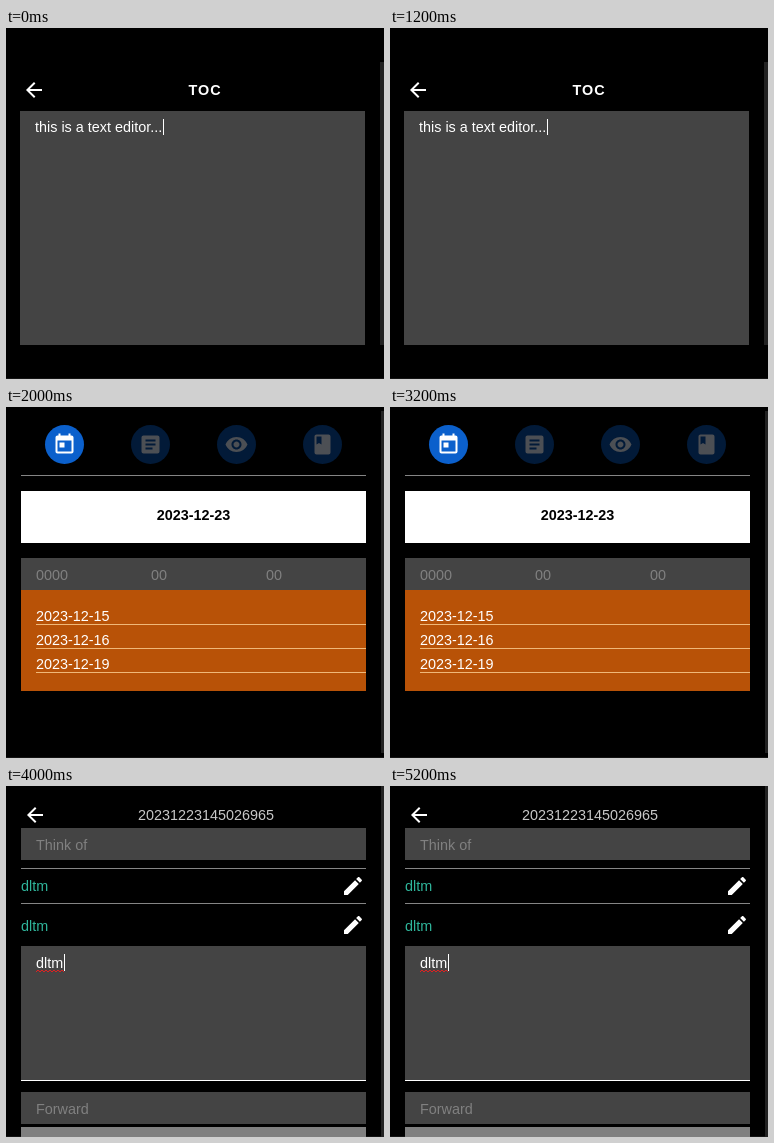
Recreate the animation shown at these times as an HTML page with a canvas. Size 378 by 351 pixels, loop 6 s.

```html
<!DOCTYPE html>
<html lang="en">
<head>
<meta charset="utf-8">
<title>Notes</title>
<style>
  html, body { margin: 0; width: 100%; height: 100%; overflow: hidden; background: #000; }
  canvas { display: block; }
</style>
</head>
<body>
<canvas id="stage" width="378" height="351"></canvas>
<script>
const ctx = document.getElementById('stage').getContext('2d');
const SCREEN_MS = 2000;
const FONT = '14.4px "Liberation Sans", Arial, sans-serif';
const PANEL = '#444', MUTED = '#808080', RULE = '#858585';

// Icons on a 24 px grid
const icons = {
  back: 'M20 11H7.83l5.59-5.59L12 4l-8 8 8 8 1.41-1.41L7.83 13H20z',
  today: 'M19 3h-1V1h-2v2H8V1H6v2H5c-1.11 0-1.99.9-1.99 2L3 19c0 1.1.89 2 2 2h14c1.1 0 2-.9 2-2V5c0-1.1-.9-2-2-2zm0 16H5V8h14zM7 10h5v5H7z',
  article: 'M19 3H5c-1.1 0-2 .9-2 2v14c0 1.1.9 2 2 2h14c1.1 0 2-.9 2-2V5c0-1.1-.9-2-2-2zm-5 14H7v-2h7zm3-4H7v-2h10zm0-4H7V7h10z',
  eye: 'M12 4.5C7 4.5 2.73 7.61 1 12c1.73 4.39 6 7.5 11 7.5s9.27-3.11 11-7.5c-1.73-4.39-6-7.5-11-7.5zM12 17c-2.76 0-5-2.24-5-5s2.24-5 5-5 5 2.24 5 5-2.24 5-5 5zm0-8c-1.66 0-3 1.34-3 3s1.34 3 3 3 3-1.34 3-3-1.34-3-3-3z',
  book: 'M18 2H6c-1.1 0-2 .9-2 2v16c0 1.1.9 2 2 2h12c1.1 0 2-.9 2-2V4c0-1.1-.9-2-2-2zM6 4h5v8l-2.5-1.5L6 12z',
  edit: 'M3 17.25V21h3.75L17.81 9.94l-3.75-3.75zM20.71 7.04c.39-.39.39-1.02 0-1.41l-2.34-2.34c-.39-.39-1.02-.39-1.41 0l-1.83 1.83 3.75 3.75z'
};
for (const name in icons) icons[name] = new Path2D(icons[name]);

function rect(x, y, w, h, color) {
  ctx.fillStyle = color;
  ctx.fillRect(x, y, w, h);
}

function text(value, x, y, color = '#fff', { align = 'left', bold = false, spacing = 0 } = {}) {
  ctx.font = (bold ? 'bold ' : '') + FONT;
  ctx.textAlign = align;
  ctx.letterSpacing = spacing + 'px';
  ctx.fillStyle = color;
  ctx.fillText(value, x, y);
}

function icon(name, x, y, color = '#fff') {
  ctx.save();
  ctx.translate(x, y);
  ctx.fillStyle = color;
  ctx.fill(icons[name]);
  ctx.restore();
}

function field(label, y) {
  rect(15, y, 345, 32, PANEL);
  text(label, 30, y + 22, MUTED);
}

function squiggle(x, y, width) {
  ctx.beginPath();
  for (let i = 0; i <= width; i += 2) ctx.lineTo(x + i, y + (i % 4 ? -1 : 1));
  ctx.strokeStyle = '#e02020';
  ctx.lineWidth = 1;
  ctx.stroke();
}

function editor() {
  rect(374, 34, 4, 283, '#222');
  icon('back', 16, 50);
  text('TOC', 199, 67, '#fff', { align: 'center', bold: true, spacing: 1 });
  rect(14, 83, 345, 234, PANEL);
  text('this is a text editor...', 29, 104);
  rect(157, 91, 1, 16, '#fff');
}

function calendar() {
  rect(375, 4, 3, 342, '#222');
  ['today', 'article', 'eye', 'book'].forEach((name, i) => {
    const x = 58.5 + i * 86;
    ctx.beginPath();
    ctx.arc(x, 37.5, 19.5, 0, Math.PI * 2);
    ctx.fillStyle = i ? '#021a38' : '#0b60cc';
    ctx.fill();
    icon(name, x - 12, 25.5, i ? '#4c4f54' : '#fff');
  });
  rect(15, 68, 345, 1, RULE);
  rect(15, 84, 345, 52, '#fff');
  text('2023-12-23', 187.5, 113, '#000', { align: 'center', bold: true });
  rect(15, 151, 345, 32, PANEL);
  ['0000', '00', '00'].forEach((hint, i) => text(hint, 30 + i * 115, 173, MUTED));
  rect(15, 183, 345, 101, '#b85207');
  ['15', '16', '19'].forEach((day, i) => {
    text('2023-12-' + day, 30, 214 + i * 24);
    rect(30, 217 + i * 24, 330, 1, '#f0b878');
  });
}

function note() {
  rect(375, 0, 3, 351, '#222');
  icon('back', 17, 17);
  text('20231223145026965', 200, 34, '#c8c8c8', { align: 'center' });
  field('Think of', 42);
  rect(15, 82, 345, 1, RULE);
  rect(15, 117, 345, 1, RULE);
  [105, 145].forEach((y, i) => {
    text('dltm', 15, y, '#2fb59b');
    icon('edit', 335, 88 + i * 39);
  });
  rect(15, 160, 345, 134, PANEL);
  rect(15, 294, 345, 1, '#fff');
  text('dltm', 30, 182);
  squiggle(30, 185, 28);
  rect(58, 168, 1, 17, '#fff');
  field('Forward', 306);
  rect(15, 341, 345, 10, MUTED);
}

const screens = [editor, calendar, note];

function draw(now) {
  rect(0, 0, 378, 351, '#000');
  rect(0, 350, 378, 1, '#141414');
  screens[Math.floor(now / SCREEN_MS) % screens.length]();
}

const start = performance.now();
function tick() {
  draw(performance.now() - start);
  requestAnimationFrame(tick);
}
tick();
</script>
</body>
</html>
```
